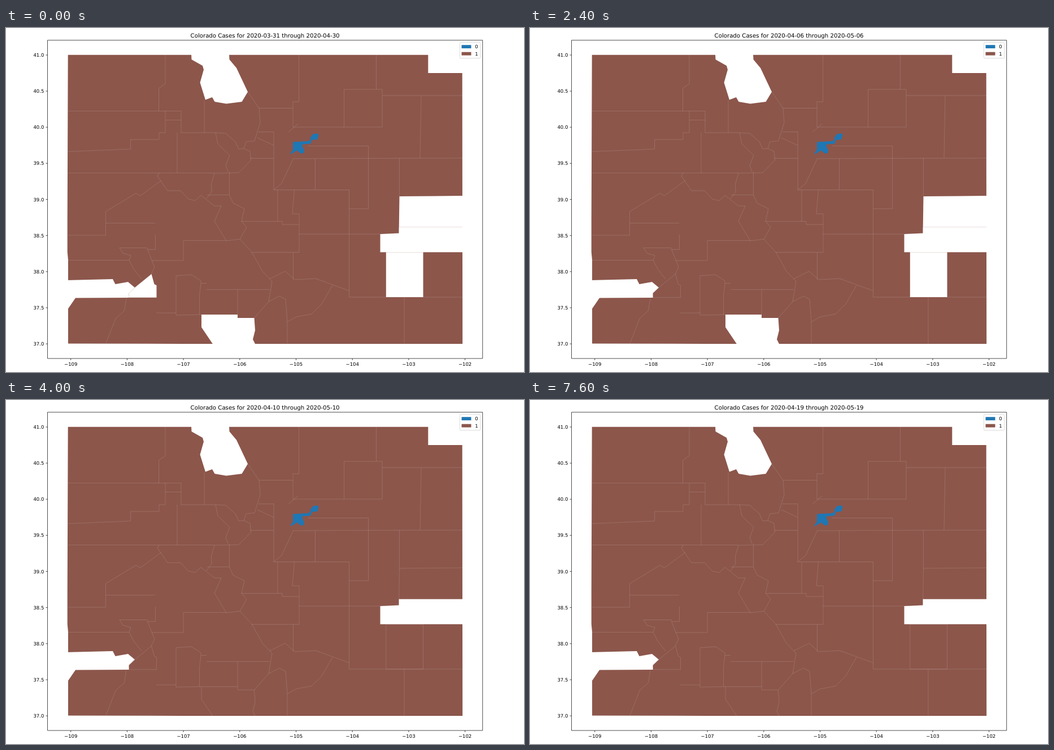
These frames come from a looping animation (917 by 611 pixels, 8000 ms). An HTML page:

```html
<!DOCTYPE html>
<html>
<head>
<meta charset="utf-8">
<style>
html, body { margin: 0; width: 100%; height: 100%; overflow: hidden; background: #fff }
svg { display: block }
text { font: 8.49px "DejaVu Sans", sans-serif; text-rendering: geometricPrecision }
#title { font-size: 10.19px; text-anchor: middle }
.seam { fill: none; stroke: #fff; stroke-opacity: .19; stroke-width: .7 }
.gap { fill: #fff }
.axis { fill: none; stroke: #000; stroke-width: .7 }
</style>
</head>
<body>
<svg width="917" height="611" viewBox="0 0 917 611">
  <path fill="#8c564b" d="M109.700 47.800H747.300V80H807.700L808.200 561H313L110 560.500V412L108.700 398V340Z"/>
  <path class="seam" id="survey"/>
  <path class="seam" id="ridges"/>
  <g id="counties"></g>
  <path fill="#1f77b4" d="M508 202.500L535 201 540 197 538 195.500 544 188 552 187.500 553.500 190 551 198 541 199 539.500 205.500 525 206.500V211L528 217 527 222 522 223 515 217.500 505 224 503.500 222.500 508 216Z"/>
  <path class="axis" id="axes"/>
  <g id="labels"></g>
  <rect x="803.500" y="25.900" width="36.200" height="27.900" rx="1.700" fill="#fff" stroke="#ccc" stroke-width=".7"/>
  <g id="legend"></g>
  <text id="title" x="458.600" y="16.500"></text>
</svg>
<script>
const $ = id => document.getElementById(id);

// Straight borders run along meridians and parallels
const survey = `M110 147.500H310V186H371M282 48V99L270.500 107V147.500M282 147.500V186H271V198H220.500V215L110 219.500
  M282 163.500H310M303 186V257.500M351 186V128M110 257.500H369M176.500 326V368H110M176.500 346.500H264M110 412.500H218
  M258 413H314V377.500H390M264.500 367V393.500H251M266 506H301M355 464.500H467M410 464.500V509
  M448 142.500H508M508 176V131H518.500V48M447 184.500H474V287.500H607.500V478H808M508 176H666V109H598.500V176M655.500 48V109
  M666 120H808M735 120L733 231M432 231.500H474M508 232L808 231M535 209.500H641.500V321H607.500M547.500 232V287.500M519 366H663
  M696.500 231V299M435 398.500H519V330H507L510.500 287.500M508.500 399V447M417 343.500H489V349H519M481 343.500V287.500M705 478V560`;

// Natural borders follow rivers and divides
const ridges = `M393 255L389 244 396 226 375 206 371 186 389 187 406 202 412 215 421 214 425 202 440 200.500 450 168 448 142.500 428 113.500
  M421 214L432 219 433.500 235 412 257 369 258 363.500 277 364 291 355 303
  M271 257.500L268 263 286 289H309L323 304 335 306.500 345 297 369 316H381L369 343 390 378 414 375
  M275 270.500L238 298 230 293.500 176.500 326M356 296.500H395M395.500 255.500V297L402 311 422 321 417 343.500 426 354 414 375
  L435 398 454 432 471 450 465 486M257 437L263 425 249.500 390.500H201L207 400 221 404 218 412.500 226 428 240 446
  M213 480L209.500 502 194 516 177 560M301 440V510L346 509M301 440L328 438 345 449V453.500H355M345 453.500L342.500 475V509
  M439.500 515L465 486 484 476 495 482 498 522V560M467 445.500L494 432 511 447 548 445 607 466.500
  M578 457L559 490 541 508 514 513 498 522M474 287.500L488 276 508.500 232M445 195L474 208.500M500 185L517 170`;

// Counties are blank until the step when they first have cases
const counties = [
  { from: Infinity, d: "M328 46L328.500 56 348 67 350 74 343.500 97 353 127.500 365 123 369.500 131 390 134.500 417.500 131 428 113.500 408 71 395.500 56 395 46Z" },
  { from: Infinity, d: "M107 448L189 446 193.500 455 216 451 228 461 217.500 471V479L123 479.500 110 498.500H107Z" },
  { from: Infinity, d: "M662.500 398.300V366L695.500 364.500V353.700H810V398.300Z" },
  { from: 6, d: "M228 461L257.500 437 262.500 455 266.500 457V478.700H217.500V471Z" },
  { from: 7, d: "M346 509H410V515H439.500L441 537 437 553 441.500 562H366.500L346 531.500Z" },
  { from: 7, d: "M695.700 353.700L696.500 299 808.500 298V353.700Z" },
  { from: 10, d: "M672.800 398.300H738.500V478H672.800Z" }
];

$("survey").setAttribute("d", survey);
$("ridges").setAttribute("d", ridges);
$("counties").innerHTML = counties.map(c => `<path d="${c.d}"/>`).join("");
$("legend").innerHTML = ["#1f77b4", "#8c564b"].map((color, i) =>
  `<path fill="${color}" d="M806.500 ${30.2 + i * 12.5}h17v5.900h-17z"/><text x="830.300" y="${36.3 + i * 12.5}">${i}</text>`).join("");

let axes = "M73.500 21.700H843.700V587H73.500Z", labels = "";
for (let i = 0; i < 8; i++) {
  const x = 114.7 + i * 99.7;
  axes += `M${x} 587v3`;
  labels += `<text x="${x}" y="600.300" text-anchor="middle">−${109 - i}</text>`;
}
for (let i = 0; i < 9; i++) {
  const y = 48 + i * 64.13;
  axes += `M73.500 ${y}h-3`;
  labels += `<text x="67.300" y="${y + 3.1}" text-anchor="end">${(41 - i / 2).toFixed(1)}</text>`;
}
$("axes").setAttribute("d", axes);
$("labels").innerHTML = labels;

const day = (month, date) => new Date(Date.UTC(2020, month, date)).toISOString().slice(0, 10);
let shown = -1;

function draw(step) {
  $("title").textContent = `Colorado Cases for ${day(2, 31 + step)} through ${day(3, 30 + step)}`;
  counties.forEach((c, i) =>
    $("counties").children[i].setAttribute("class", step < c.from ? "gap" : "seam"));
}

function tick(now) {
  const step = Math.floor(now % 8000 / 400);
  if (step !== shown) draw(shown = step);
  requestAnimationFrame(tick);
}
tick(0);
</script>
</body>
</html>
```
